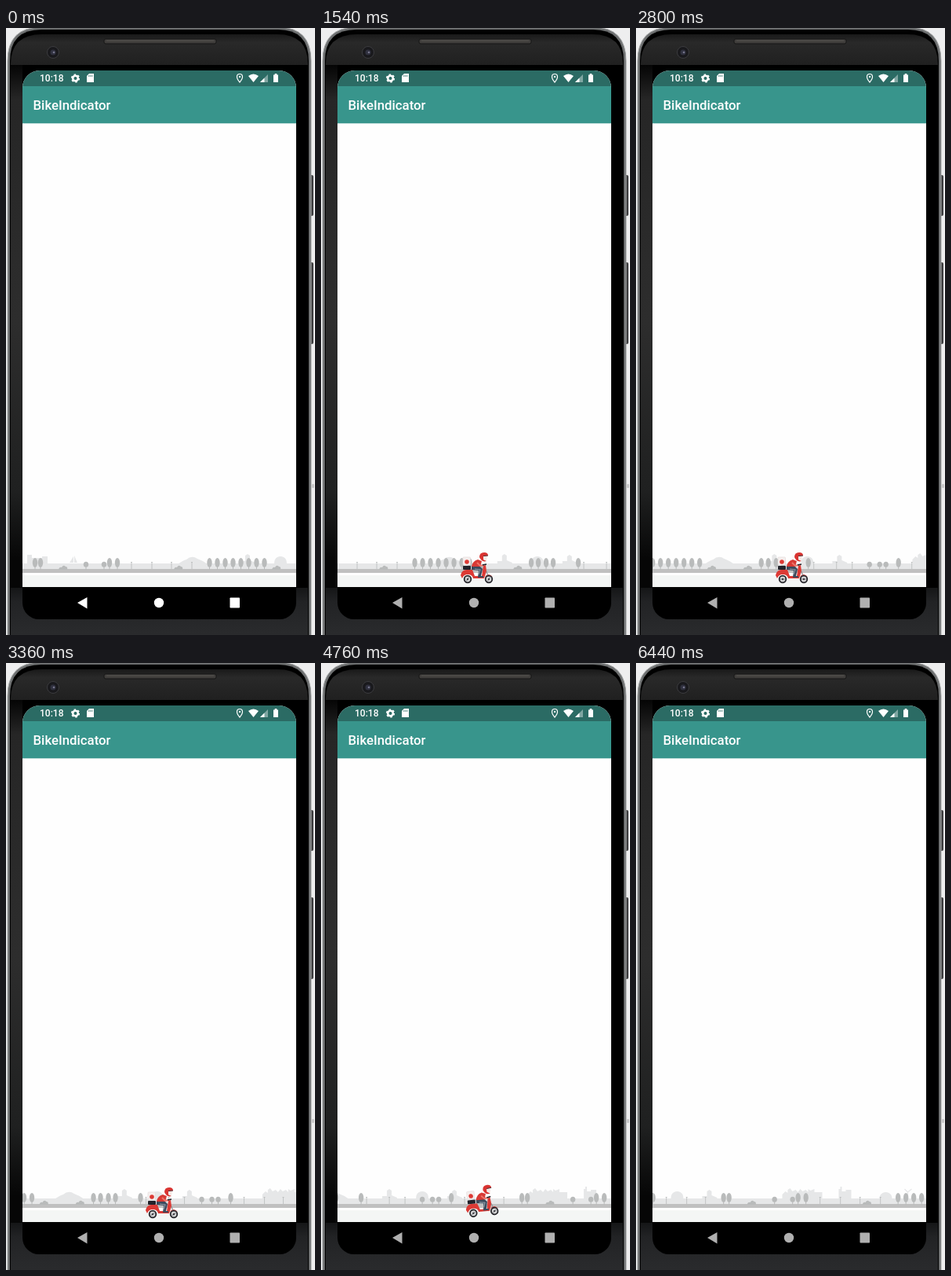
An HTML page that plays this animation: 394 px wide and 772 px high, repeating every 6.51 s.

```html
<!DOCTYPE html>
<html lang="en">
<head>
<meta charset="utf-8">
<title>Bike indicator</title>
<style>
html, body { margin: 0; width: 100%; height: 100%; overflow: hidden; background: #eeeeef; }
svg { display: block; width: 394px; height: 772px; }
text { font-family: Roboto, Arial, sans-serif; font-weight: 500; fill: #fff; }
</style>
</head>
<body>
<svg viewBox="0 0 394 772">
  <defs>
    <linearGradient id="side" x2="0" y2="1">
      <stop offset="0" stop-color="#050505"/><stop offset=".06" stop-color="#262626"/>
      <stop offset=".45" stop-color="#2d2d2d"/><stop offset=".75" stop-color="#1f2020"/>
      <stop offset=".87" stop-color="#060606"/><stop offset="1" stop-color="#060606"/>
    </linearGradient>
    <linearGradient id="bezel" x2="0" y2="1">
      <stop offset="0" stop-color="#161616"/><stop offset=".3" stop-color="#292929"/>
      <stop offset="1" stop-color="#202020"/>
    </linearGradient>
    <linearGradient id="foot" x2="0" y2="1">
      <stop offset="0" stop-color="#151617"/><stop offset=".3" stop-color="#222325"/>
      <stop offset="1" stop-color="#2a2b2d"/>
    </linearGradient>
    <clipPath id="screen"><path d="M21 711V76A22 22 0 0 1 43 54H348A22 22 0 0 1 370 76V711Z"/></clipPath>
    <clipPath id="body"><path d="M6 772V46Q6 8 46 8H346Q385 8 385 46V772Z"/></clipPath>
  </defs>

  <!-- phone -->
  <g fill="#3b3b3d"><rect x="385" y="187" width="7" height="52" rx="2"/><rect x="385" y="298" width="7" height="104" rx="2"/></g>
  <rect x="390" y="580" width="3" height="5" rx="1" fill="#c9c9ca"/>
  <path d="M2 780V42Q2 -1 45 -1H347Q389 -1 389 42V780Z" fill="#6d6f70" stroke="#a5a7a8"/>
  <path d="M5 772V42Q5 2 45 2H347Q386 2 386 42V772Z" fill="#000"/>
  <g clip-path="url(#body)">
    <rect x="5" y="47" width="16" height="725" fill="url(#side)"/>
    <rect x="5" y="712" width="382" height="60" fill="url(#foot)"/>
    <path d="M5 47V6H387V47Z" fill="url(#bezel)"/>
  </g>
  <rect x="125" y="14" width="143" height="6" rx="2" fill="#403e3c" stroke="#151515"/>
  <path d="M128 16H265" stroke="#575451"/>
  <circle cx="60" cy="31" r="7.5" fill="#19191c" stroke="#3c3c3f"/>
  <circle cx="60" cy="31" r="3.5" fill="#30313f"/>
  <circle cx="61" cy="31" r="1.3" fill="#74748a"/>

  <!-- app -->
  <g clip-path="url(#screen)">
    <rect x="21" y="54" width="349" height="657" fill="#fefefe"/>
    <rect x="21" y="54" width="349" height="20" fill="#2b6b64"/>
    <rect x="21" y="74" width="349" height="47" fill="#38958c"/>
    <path d="M21 121.500H370" stroke="#c3dfdc"/>
    <rect x="21" y="681" width="349" height="7" fill="#e6e7e8"/>
    <g id="far" fill="#e6e7e8" stroke="#e6e7e8" stroke-width="0"></g>
    <rect x="21" y="688" width="349" height="5" fill="#c0c0c0"/>
    <rect x="21" y="693" width="349" height="18" fill="#f4f6f5"/>
    <path d="M21 694.500H370" stroke="#fff" stroke-width="3"/>
    <g id="near" fill="#b9bbbb" stroke="#b9bbbb" stroke-width="0"></g>
    <g id="bike">
      <!-- body -->
      <path d="M-9 -5Q-8 -11 -2 -12H6L9 -4H18L20 -17L23 -18L24 -10L21 -1H7Q6 -6 0 -6Q-5 -6 -7 -1Z" fill="#dc3a35"/>
      <path d="M22 -3Q26 -9 32 -3L27 -5Z" fill="#dc3a35"/>
      <path d="M24 -10L27 0" stroke="#8d9094" stroke-width="1.200"/>
      <rect x="-6" y="-17" width="10" height="5" rx="1" fill="#22222a"/>
      <rect x="-6" y="-28" width="9.500" height="10" rx="1" fill="#f5efee" stroke="#e0d9d8" stroke-width=".6"/>
      <circle cx="-1" cy="-22" r="2.800" fill="#dc3a35"/>
      <!-- rider -->
      <path d="M5 -17L15 -17L19 -13L17 -4H20V-2H13L14 -11L5 -12Z" fill="#3d4a5c"/>
      <path d="M9 -13L16 -12L14 -6" fill="none" stroke="#8b98a4" stroke-width="1.200"/>
      <path d="M5 -16Q6 -23 13 -25L18 -23L16 -16Z" fill="#d83a35"/>
      <path d="M12 -21L16 -17L21 -18" fill="none" stroke="#ee7468" stroke-width="2"/>
      <path d="M19 -18L24 -19" stroke="#22222a" stroke-width="1.500"/>
      <path d="M15 -28Q15 -34 21 -34Q26 -34 26 -30L20 -29L20 -25L24 -23Q18 -21 15 -28Z" fill="#d93431"/>
      <path d="M20 -29L25 -29L24 -24L20 -25Z" fill="#f4e9e5"/>
      <path d="M20 -29.500L26 -30" stroke="#51343a"/>
      <g id="wheels"></g>
    </g>
  </g>

  <!-- status bar -->
  <text x="43" y="68.300" font-size="12">10:18</text>
  <text x="34.500" y="103.900" font-size="16.800">BikeIndicator</text>
  <g fill="#fff">
    <circle cx="88.500" cy="64" r="3.300" fill="none" stroke="#fff" stroke-width="2.500"/>
    <circle cx="88.500" cy="64" r="4.800" fill="none" stroke="#fff" stroke-width="1.600" stroke-dasharray="2.500 2.527"/>
    <path d="M103 61L106 58H112V69H103Z"/>
    <path d="M105.800 60V62M107.800 60V62M109.800 60V62" stroke="#2b6b64" stroke-width=".8"/>
    <path d="M298 69Q294.500 65 294.500 62A3.500 3.500 0 0 1 301.500 62Q301.500 65 298 69Z" fill="none" stroke="#fff" stroke-width="1.200"/>
    <circle cx="298" cy="62" r="1.200"/>
    <path d="M309 61Q315.500 56 322 61L315.500 69Z"/>
    <path d="M324 69L334 59V69Z" opacity=".4"/><path d="M324 69L329.500 63.500V69Z"/>
    <path d="M341 59.500H342.700V58H345.300V59.500H347V69H341Z"/>
  </g>

  <!-- navigation -->
  <path d="M21 711H370V731A21 21 0 0 1 349 752H42A21 21 0 0 1 21 731Z"/>
  <g id="nav"><path d="M91 731L103.500 724V738.500Z"/><circle cx="195" cy="731" r="6.200"/><rect x="285.500" y="724.500" width="12.500" height="13" rx=".8"/></g>
</svg>
<script>
const $ = id => document.getElementById(id);
const LOOP = 6510, STEP = 70, PERIOD = 636;

const ellipse = (x, y, rx, ry) => `<ellipse cx="${x}" cy="${y}" rx="${rx}" ry="${ry}"/>`;
const line = (d, w) => `<path d="${d}" fill="none" stroke-width="${w}"/>`;
const shape = d => `<path d="${d}"/>`;
const tall = x => ellipse(x, 680, 3.2, 6) + line(`M${x} 680V689`, 1);
const short = x => ellipse(x, 682.3, 3.2, 3.5) + line(`M${x} 682V689`, 1);
const post = x => line(`M${x} 679V688M${x - 1} 679.5H${x + 1}`, .8);
const bush = x => shape(`M${x - 6} 689Q${x - 5} 685 ${x - 2} 686Q${x} 682 ${x + 3} 685Q${x + 6} 685 ${x + 5} 689Z`);
const dome = (x, w, y) => shape(`M${x - w} 681Q${x - w} ${y + 3} ${x - w / 2} ${y + 1}Q${x} ${y - 1} ${x + w / 2} ${y + 1}Q${x + w} ${y + 3} ${x + w} 681Z`);
const tower = (x, y) => shape(`M${x - 9} 682V678H${x - 3}V${y + 1}L${x} ${y - 1}L${x + 3} ${y + 1}V677L${x + 10} 680V682Z`);

const row = [...Array(8)].map((_, i) => 259.5 + i * 10);
const strip = [37, 44, 132, 142, ...row, 408, 417, 427, 436, 468, 583].map(tall).join('')
  + [102, 125, 546, 559, 567].map(short).join('')
  + [14, 160, 186, 211, 237, 475, 504, 524, 600, 626].map(post).join('')
  + [73, 220, 345, 391].map(bush).join('');
$('near').innerHTML = strip + `<g transform="translate(${PERIOD})">${strip}</g>`;

const hill = shape('M219 682Q226 677 230 676Q237 670 244 675Q250 677 257 682Z');
const sail = shape('M81 680L86 672V680ZM87 680V671L91 680Z');
const town = shape('M484 682V676L488 672L491 674V670L494 668L497 672L501 670L504 673L507 669L510 672L514 670L517 673V669L520 671L525 669V673H535V682Z');
const blocks = x => shape(`M${x} 682V669H${x + 2}V666H${x + 4}V672H${x + 9}V670H${x + 16}V682Z`);
const turbine = line('M644 681V673L640 669M644 673L649 669', 1.2);
$('far').innerHTML = shape('M27 682V670H33V674H46V672H53V682Z') + sail + hill + tower(308, 670)
  + dome(350, 8, 672) + tower(391, 671) + town + blocks(556) + dome(616, 8, 673) + turbine;

const wheel = x => `<g transform="translate(${x})"><circle r="4.300" fill="#d5d6d7" stroke="#26262b" stroke-width="1.800"/><g class="spin"><path d="M-3 0H3" stroke="#85878b"/><circle r="1.200" fill="#404046"/></g></g>`;
$('wheels').innerHTML = wheel(0) + wheel(27);
const spins = document.querySelectorAll('.spin');

const clamp = v => Math.max(0, Math.min(1, v));

function draw(now) {
  const t = Math.floor(now % LOOP / STEP) * STEP;
  const scroll = t * .086 + 7.5 * clamp(t / 910);
  $('near').setAttribute('transform', `translate(${-scroll})`);
  $('far').setAttribute('transform', `translate(${-scroll * .53})`);

  // brakes into the middle, later speeds off; the front lifts with speed
  const arrive = 1 - clamp((t - 420) / 1080);
  const leave = clamp((t - 4556) / 1080);
  const x = 187 + 206 * (leave ** 2 - arrive ** 2);
  const tilt = 31 * Math.max(arrive, leave);
  $('bike').setAttribute('transform', `translate(${x} ${701 - tilt / 4.8}) rotate(${-tilt})`);
  $('bike').style.display = t < 420 || t > 5636 ? 'none' : '';
  spins.forEach(s => s.setAttribute('transform', `rotate(${t * .9})`));

  const grey = Math.round(255 - 79 * clamp(t / 1200));
  $('nav').setAttribute('fill', `rgb(${grey},${grey},${grey})`);
}

const start = performance.now();
(function tick() {
  draw(performance.now() - start);
  requestAnimationFrame(tick);
})();
</script>
</body>
</html>
```
